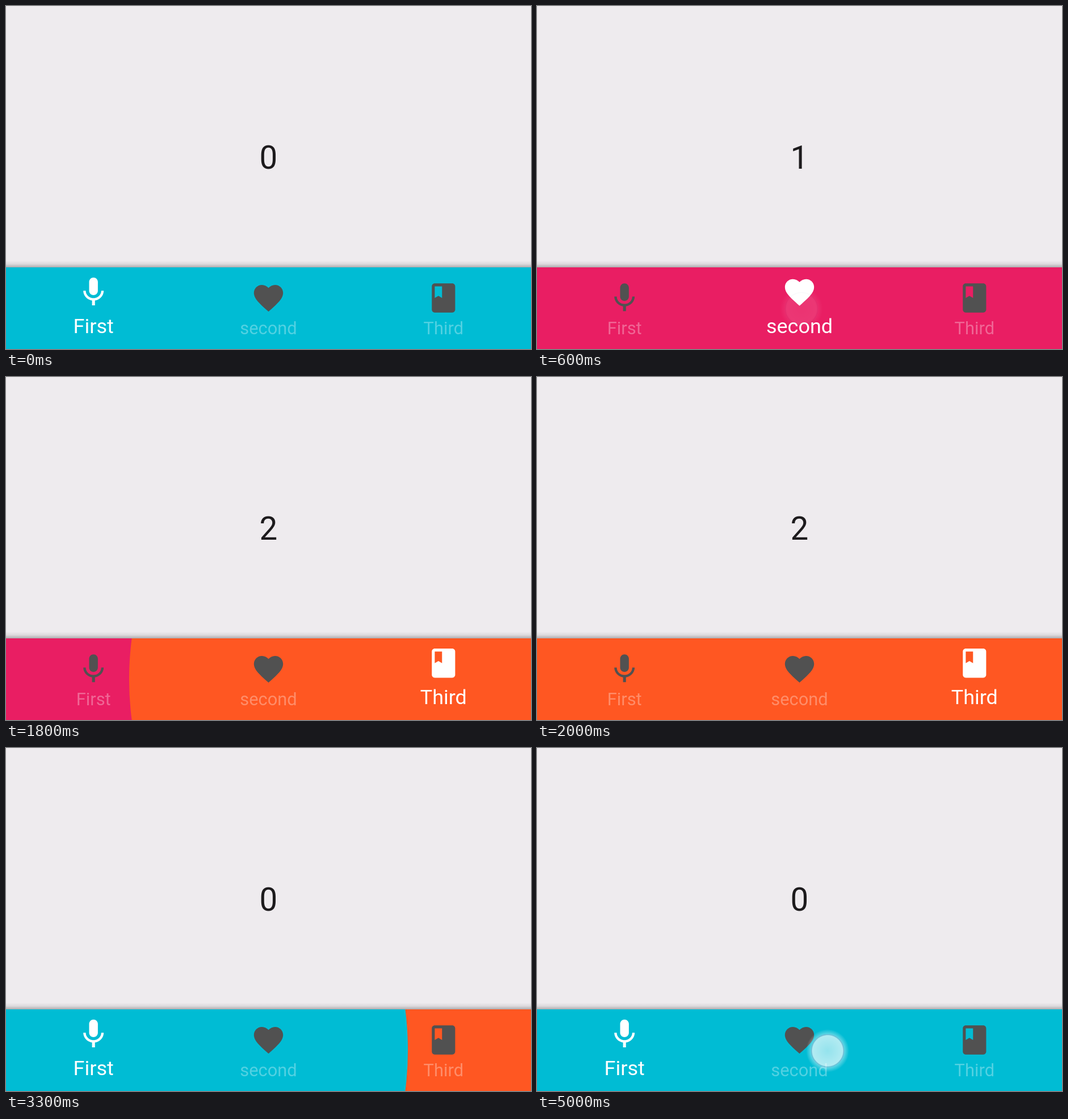
Write an HTML page that moves like this. It is 925 px wide and 605 px high and loops after 5.1 s.

```html
<!DOCTYPE html>
<html lang="en">
<head>
<meta charset="utf-8">
<title>Bottom navigation</title>
<style>
  html, body { margin: 0; width: 100%; height: 100%; overflow: hidden; background: #eeebee; }
  svg { display: block; width: 925px; height: 605px; }
  text { font-family: Roboto, sans-serif; text-anchor: middle; }
</style>
</head>
<body>
<svg viewBox="0 0 925 605">
  <defs>
    <linearGradient id="shade" x2="0" y2="1">
      <stop offset="0" stop-color="#000" stop-opacity="0"/>
      <stop offset=".5" stop-color="#000" stop-opacity=".07"/>
      <stop offset="1" stop-color="#000" stop-opacity=".27"/>
    </linearGradient>
    <radialGradient id="glow">
      <stop offset="0" stop-color="#fff" stop-opacity=".58"/>
      <stop offset=".7" stop-color="#fff" stop-opacity=".7"/>
      <stop offset=".75" stop-color="#fff" stop-opacity=".4"/>
      <stop offset="1" stop-color="#fff" stop-opacity="0"/>
    </radialGradient>
    <clipPath id="bar"><rect y="461" width="925" height="144"/></clipPath>
  </defs>
  <rect width="925" height="605" fill="#eeebee"/>
  <text id="number" x="462.5" y="286.5" font-size="56.5" fill="#1d1b1d"></text>
  <rect y="449" width="925" height="12" fill="url(#shade)"/>
  <g clip-path="url(#bar)">
    <rect id="base" y="461" width="925" height="144"/>
    <circle id="reveal" cy="533"/>
  </g>
  <g id="tabs"></g>
  <g id="touch">
    <circle r="38" fill="url(#glow)"/>
    <circle r="28.5" fill="none" stroke="#7d86b4" stroke-opacity=".4" stroke-width="1.2"/>
  </g>
</svg>
<script>
const LOOP = 5100, STEP = 100;
const REVEAL = 300, SHIFT = 150;
const WIDTH = 925, DP = WIDTH / 360, BAR_TOP = 461.1;

const tabs = [
  { label: 'First', color: '#00bcd4',
    icon: 'M12 14c1.66 0 2.99-1.34 2.99-3L15 5c0-1.66-1.34-3-3-3S9 3.34 9 5v6c0 1.66 1.34 3 3 3zm5.3-3c0 3-2.54 5.1-5.3 5.1S6.7 14 6.7 11H5c0 3.41 2.72 6.23 6 6.72V21h2v-3.28c3.28-.48 6-3.3 6-6.72h-1.7z' },
  { label: 'second', color: '#e91e63',
    icon: 'M12 21.35l-1.45-1.32C5.4 15.36 2 12.28 2 8.5 2 5.42 4.42 3 7.5 3c1.74 0 3.41.81 4.5 2.09C13.09 3.81 14.76 3 16.5 3 19.58 3 22 5.42 22 8.5c0 3.78-3.4 6.86-8.55 11.54L12 21.35z' },
  { label: 'Third', color: '#ff5722',
    icon: 'M18 2H6c-1.1 0-2 .9-2 2v16c0 1.1.9 2 2 2h12c1.1 0 2-.9 2-2V4c0-1.1-.9-2-2-2zM6 4h5v8l-2.5-1.5L6 12V4z' }
];

// down: finger appears, at: tab is selected, fade: time the touch dot takes to vanish
const taps = [
  { from: 0, to: 1, down: 300, at: 390, fade: 250, x: 466, y: 534 },
  { from: 1, to: 2, down: 1600, at: 1631, fade: 150, x: 775, y: 534 },
  { from: 2, to: 0, down: 3100, at: 3131, fade: 150, x: 185, y: 536 },
  { from: 0, to: 1, down: 4900, at: LOOP, fade: 150, x: 512, y: 534 }
];

const $ = id => document.getElementById(id);
const clamp = v => Math.min(1, Math.max(0, v));
const mix = (a, b, k) => a + (b - a) * k;
const ease = k => (1 - Math.cos(Math.PI * clamp(k))) / 2;
const centerX = i => WIDTH * (2 * i + 1) / 6;

function set(el, attrs) {
  for (const name in attrs) el.setAttribute(name, attrs[name]);
}

function add(tag, attrs) {
  const el = document.createElementNS('http://www.w3.org/2000/svg', tag);
  set(el, attrs);
  return $('tabs').appendChild(el);
}

tabs.forEach((tab, i) => {
  tab.shape = add('path', { d: tab.icon });
  tab.text = add('text', { x: centerX(i), fill: '#fff' });
  tab.text.textContent = tab.label;
});

function drawTab(tab, i, active) {
  const gray = Math.round(mix(81, 255, active));
  const top = BAR_TOP + mix(9, 5, active) * DP;
  set(tab.shape, {
    transform: `translate(${centerX(i) - 12 * DP} ${top}) scale(${DP})`,
    fill: `rgb(${gray},${gray},${gray})`
  });
  set(tab.text, {
    y: mix(578.5, 577, active),
    'font-size': mix(12, 14, active) * DP,
    'fill-opacity': mix(.32, 1, active)
  });
}

function draw(t) {
  const last = taps.filter(tap => tap.at <= t).pop();
  const current = last ? last.to : 0;
  const previous = last ? last.from : 0;
  const age = last ? t - last.at : LOOP;
  const shift = ease(age / SHIFT);

  $('number').textContent = current;
  set($('base'), { fill: tabs[age < REVEAL ? previous : current].color });
  set($('reveal'), {
    cx: centerX(current),
    r: WIDTH * ease(age / REVEAL),
    fill: tabs[current].color
  });
  tabs.forEach((tab, i) =>
    drawTab(tab, i, i === current ? shift : i === previous ? 1 - shift : 0));

  const finger = taps.find(tap => t >= tap.down && t < tap.at + tap.fade);
  set($('touch'), finger
    ? { transform: `translate(${finger.x} ${finger.y})`, opacity: 1 - clamp((t - finger.at) / finger.fade) }
    : { opacity: 0 });
}

function tick() {
  draw(Math.floor(performance.now() % LOOP / STEP) * STEP);
  requestAnimationFrame(tick);
}
tick();
</script>
</body>
</html>
```
